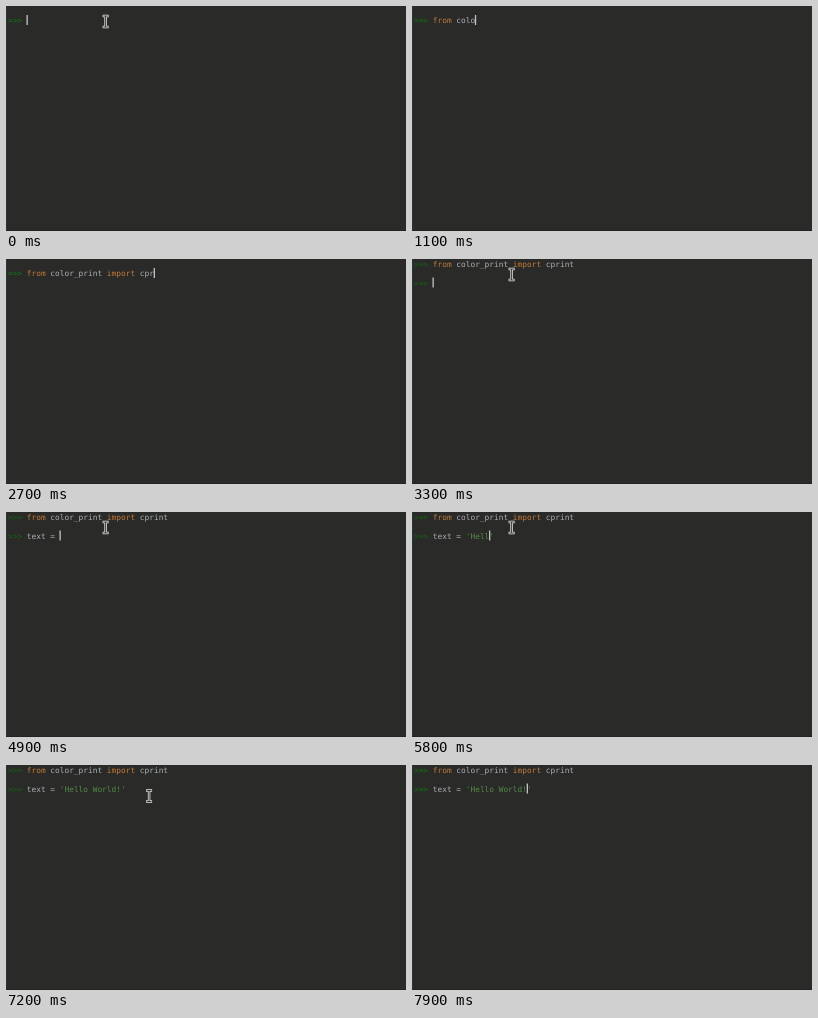
Write an HTML page that moves like this. It is 400 px wide and 225 px high and loops after 8 s.

```html
<!DOCTYPE html>
<html lang="en">
<head>
<meta charset="utf-8">
<title>Python console</title>
<style>
  html, body { margin: 0; width: 100%; height: 100%; overflow: hidden; background: #2a2a28; }
  svg { display: block; width: 100vw; height: 100vh; }
  text {
    font: 7.82px "DejaVu Sans Mono", monospace;
    white-space: pre;
    text-rendering: geometricPrecision;
  }
</style>
</head>
<body>
<svg viewBox="0 0 400 225">
  <rect width="400" height="225" fill="#2a2a28"/>
  <rect width="1" height="225" fill="#2b343c"/>
  <rect y="224" width="400" height="1" fill="#222322"/>
  <g id="code"></g>
  <path id="error" d="M96.5 18h4" stroke="#8a4038" stroke-width=".8"/>
  <path id="typo" d="M86.8 27.6H105" stroke="#4f7a48" stroke-width=".9"/>
  <g id="bulb">
    <circle cx="30" cy="32.6" r="3.5" fill="#e3b341"/>
    <path d="M28.4 35.2h3.2v3.2h-3.2z" fill="#a9a49a"/>
    <path d="M28.4 36.8h3.2" stroke="#5b5851" stroke-width=".6"/>
  </g>
  <rect id="caret" width="1.3" height="10" fill="#c4c4c4"/>
  <g id="mouse" fill="none">
    <path d="M-3-5.5H3M-3 5.5H3M0-5.5V5.5" stroke="#e6e6e6" stroke-width="2.5"/>
    <path d="M-2.4-5.5H2.4M-2.4 5.5H2.4M0-5.5V5.5" stroke="#111" stroke-width=".8"/>
  </g>
</svg>
<script>
const LOOP = 8000, STEP = 100, LEFT = 20.8, ADV = 4.71;
const GREY = '#a9b0b4', ORANGE = '#c27a3a', GREEN = '#548a48', PROMPT = '#127a12';
const $ = id => document.getElementById(id);

// [start, end, characters at start]; one more character every 100 ms
const importRuns = [[400, 700, 1], [800, 1800, 6], [1900, 2000, 18], [2100, 3000, 21]];
const textRuns = [[4300, 4700, 1], [4900, 5000, 7], [5500, 5900, 9], [6000, 6300, 15], [6700, 6800, 19]];

function typed(runs, t) {
  let n = 0;
  for (const [start, end, first] of runs)
    if (t >= start) n = first + (Math.min(t, end) - start) / STEP;
  return n;
}

function addText(str, col) {
  const el = document.createElementNS('http://www.w3.org/2000/svg', 'text');
  el.setAttribute('x', LEFT + col * ADV);
  $('code').append(el);
  return { el, str, col };
}

function put(token, str, y, color) {
  token.el.textContent = str;
  token.el.setAttribute('y', y);
  token.el.setAttribute('fill', color);
}

const prompts = [addText('>>>', -4), addText('>>>', -4)];
const importLine = [['from', 0, ORANGE], ['color_print', 5, GREY], ['import', 17, ORANGE], ['cprint', 24, GREY]]
  .map(([s, c, color]) => ({ ...addText(s, c), color }));
const textLine = [['text', 0, GREY], ['=', 5, GREY], ["'Hello World!", 7, GREEN]]
  .map(([s, c, color]) => ({ ...addText(s, c), color }));
const closing = addText("'", 0);

function typeLine(tokens, n, y) {
  for (const tk of tokens) {
    const part = tk.str.slice(0, Math.max(0, n - tk.col));
    const keywordOpen = tk.color === ORANGE && part !== tk.str;
    put(tk, part, y, keywordOpen ? GREY : tk.color);
  }
}

const show = (id, on) => $(id).setAttribute('visibility', on ? 'visible' : 'hidden');
const within = (t, a, b) => t >= a && t < b;

function draw(now) {
  const t = Math.floor((now % LOOP) / STEP) * STEP;
  const entered = t >= 3100;
  const y1 = entered ? 7.6 : 17, y2 = 26.5;
  const n1 = typed(importRuns, t), n2 = typed(textRuns, t);

  const green = within(t, 3100, 7800) ? '#126812' : PROMPT;
  put(prompts[0], '>>>', y1, green);
  put(prompts[1], t >= 3200 ? '>>>' : '', y2, green);
  typeLine(importLine, n1, y1);
  typeLine(textLine, n2, y2);

  closing.el.setAttribute('x', LEFT + n2 * ADV);
  put(closing, n2 > 7 ? "'" : '', y2, t < 5100 ? GREY : GREEN);

  const n = entered ? n2 : n1;
  $('caret').setAttribute('x', LEFT - 0.3 + n * ADV);
  $('caret').setAttribute('y', entered ? 18.5 : 9);
  show('caret', !(within(t, 3500, 3800) || within(t, 4100, 4300) || within(t, 7100, 7400)));

  show('error', within(t, 1900, 2300));
  show('typo', within(t, 6400, 6700));
  show('bulb', within(t, 6500, 6700));

  const p = Math.min(1, Math.max(0, (t - 6900) / 600));
  const ease = p * p * (3 - 2 * p);
  $('mouse').setAttribute('transform', `translate(${99.6 + 87 * ease} ${15.5 + 31 * ease})`);
  show('mouse', t < 400 || within(t, 3200, 7600));
}

const begin = performance.now();
function tick() {
  draw(performance.now() - begin);
  requestAnimationFrame(tick);
}
tick();
</script>
</body>
</html>
```
